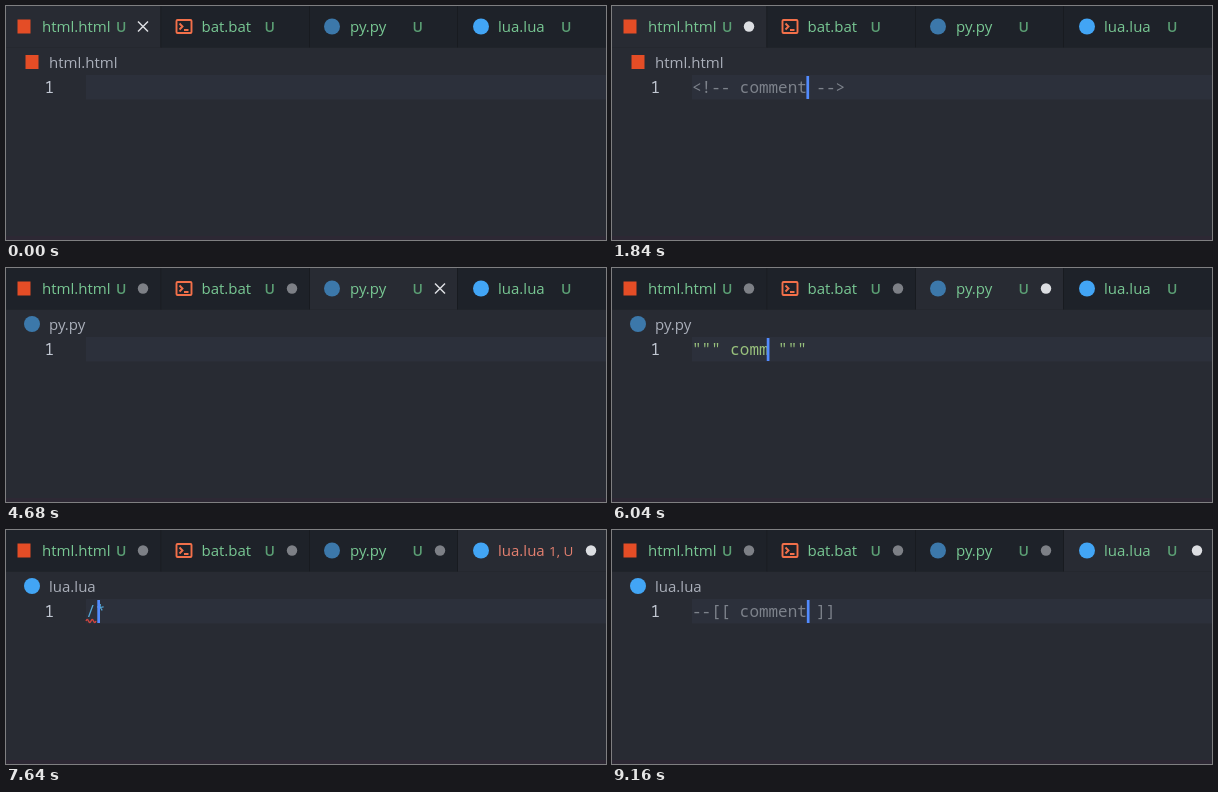
An HTML page that plays this animation: 600x234 px, repeating every 9.2 s.

```html
<!DOCTYPE html>
<html lang="en">
<head>
<meta charset="utf-8">
<title>Comment shortcuts</title>
<style>
  html, body { margin: 0; width: 100%; height: 100%; overflow: hidden; background: #282b33; }
  svg { display: block; width: 600px; height: 234px; }
  text { white-space: pre; font: 15px "Open Sans", "Noto Sans", sans-serif; }
  .name { fill: #78c793; }
  .badge { font-size: 14px; font-weight: 600; fill: #5b9f74; }
  .error { fill: #e48070; }
  .badge.error { font-size: 13.5px; font-weight: 400; }
  .mono { font: 15.95px "Noto Sans Mono", "DejaVu Sans Mono", monospace; }
  .close { stroke: #dcdee2; stroke-width: 1.5; }
</style>
</head>
<body>
<svg viewBox="0 0 600 234">
  <rect width="600" height="234" fill="#282b33"/>
  <rect width="600" height="41.5" fill="#1e2229"/>
  <g id="tabs"></g>
  <g id="crumbIcon"></g>
  <text id="crumb" x="43" y="62" fill="#aaafba"></text>
  <rect x="80" y="69" width="520" height="24.5" fill="#2c303b"/>
  <text class="mono" x="38.5" y="87" fill="#c2c8d3">1</text>
  <text class="mono" id="code" x="80" y="87"></text>
  <path id="squiggle" d="M80 91q1.25-3 2.5 0t2.5 0t2.5 0t2.5 0" fill="none" stroke="#d0453f" stroke-width="1.4"/>
  <rect id="caret" y="70" width="2.7" height="23" fill="#528bff"/>
  <rect y="230" width="600" height="4" fill="#2d2834"/>
</svg>
<script>
const LOOP = 9200, CELL = 9.57, LETTER = 130, WORD = "comment";
const GRAY = "#7d828b", CYAN = "#56a8d8";
const $ = id => document.getElementById(id);

const terminal = `<g fill="none" stroke="#f2704a" stroke-width="1.9">
  <rect x="-7.5" y="-6.5" width="15" height="13" rx="1"/>
  <path d="M-4.5-3l3 3l-3 3M0 3.5h4.5"/></g>`;
const disc = color => `<circle r="8" fill="${color}"/>`;

// open: tab shown; slash, star: shortcut keys; expand: replacement; type: first letter
const files = [
  { name: "html.html", left: 0, right: 154.5, iconX: 18, nameX: 36, badgeX: 110, endX: 137,
    icon: '<rect x="-6.5" y="-7" width="13" height="14" fill="#e44d26"/>',
    head: "<!-- ", tail: " -->", color: GRAY, raw: "#abb2bf",
    open: 0, slash: 440, star: 620, expand: 860, type: 1000 },
  { name: "bat.bat", left: 155.5, right: 303, iconX: 178, nameX: 195.5, badgeX: 258.5, endX: 286,
    icon: terminal, head: ":: ", tail: "", color: GRAY, raw: "#abb2bf",
    open: 2120, slash: 2760, star: 2900, expand: 3040, type: 3190 },
  { name: "py.py", left: 304, right: 451, iconX: 326, nameX: 344, badgeX: 406.5, endX: 434,
    icon: disc("#3c78aa"), head: '""" ', tail: ' """', color: "#98c07c", raw: CYAN,
    open: 4520, slash: 5000, star: 5160, expand: 5320, type: 5610 },
  { name: "lua.lua", left: 452, right: 600, iconX: 475, nameX: 492, badgeX: 555, endX: 585,
    icon: disc("#42a5f5"), head: "--[[ ", tail: " ]]", color: GRAY, raw: CYAN,
    open: 6760, slash: 7440, star: 7622, expand: 7800, type: 8140, lint: 7560 }
];

$("tabs").innerHTML = files.map(f => `<g>
  <rect class="back" x="${f.left}" width="${f.right - f.left}" height="41.5"/>
  <path d="M${f.right + .5} 0V41.5" stroke="#181b20"/>
  <g transform="translate(${f.iconX} 20.5)">${f.icon}</g>
  <text class="name" x="${f.nameX}" y="26">${f.name}</text>
  <text class="badge" x="${f.badgeX}" y="25.5">U</text>
  <path class="close" d="M${f.endX - 5} 15.5l10 10m0-10l-10 10"/>
  <circle class="dot" cx="${f.endX}" cy="20.5" r="5.2"/></g>`).join("");

const tabs = [...$("tabs").children].map(g => {
  const part = c => g.querySelector("." + c);
  return { back: part("back"), name: part("name"), badge: part("badge"),
           close: part("close"), dot: part("dot") };
});

function show(el, on) { el.style.visibility = on ? "visible" : "hidden"; }

function codeAt(f, t) {
  if (t < f.slash) return "";
  if (t < f.star) return "/";
  if (t < f.expand) return "/*";
  const count = t < f.type ? 0 : Math.floor((t - f.type) / LETTER) + 1;
  return f.head + WORD.slice(0, count) + f.tail;
}

// Caret stops as [time, column]
function caretStops(f) {
  const start = f.head.length;
  return [[f.open, 0], [f.slash, 1], [f.star, 2], [f.expand, start],
    ...[...WORD].map((_, i) => [f.type + i * LETTER, start + i + 1])];
}
files.forEach(f => f.stops = caretStops(f));

function caretColumn(f, t) {
  const i = f.stops.findLastIndex(s => s[0] <= t);
  const [time, column] = f.stops[i];
  const from = i ? f.stops[i - 1][1] : column;
  const p = Math.min(1, (t - time) / 80);
  const ease = p < .5 ? 3.2 * p * p : 1 - .8 * (1 - p) ** 2;
  return from + (column - from) * ease;
}

let shown = -1;
function draw(t) {
  const active = files.findLastIndex(f => f.open <= t);
  const file = files[active];

  files.forEach((f, i) => {
    const tab = tabs[i], on = i === active, dirty = t >= f.slash;
    const error = t >= f.lint && t < f.expand + 80;
    tab.back.setAttribute("fill", on ? "#282b33" : "#1e2229");
    tab.name.classList.toggle("error", error);
    tab.badge.classList.toggle("error", error);
    tab.badge.textContent = error ? "1, U" : "U";
    tab.badge.setAttribute("x", error ? f.badgeX - 12 : f.badgeX);
    show(tab.close, on && !dirty);
    show(tab.dot, dirty);
    tab.dot.setAttribute("fill", on ? "#dcdee2" : "#7d8086");
  });

  if (shown !== active) {
    shown = active;
    $("crumb").textContent = file.name;
    $("crumbIcon").innerHTML = `<g transform="translate(26 56)">${file.icon}</g>`;
  }
  $("code").textContent = codeAt(file, t);
  $("code").setAttribute("fill", t < file.expand ? file.raw : file.color);
  show($("squiggle"), t >= file.lint && t < file.expand);
  show($("caret"), t >= file.open + 240);
  $("caret").setAttribute("x", 80 + CELL * caretColumn(file, t));
}

const begin = performance.now();
function frame() {
  draw((performance.now() - begin) % LOOP);
  requestAnimationFrame(frame);
}
frame();
</script>
</body>
</html>
```
